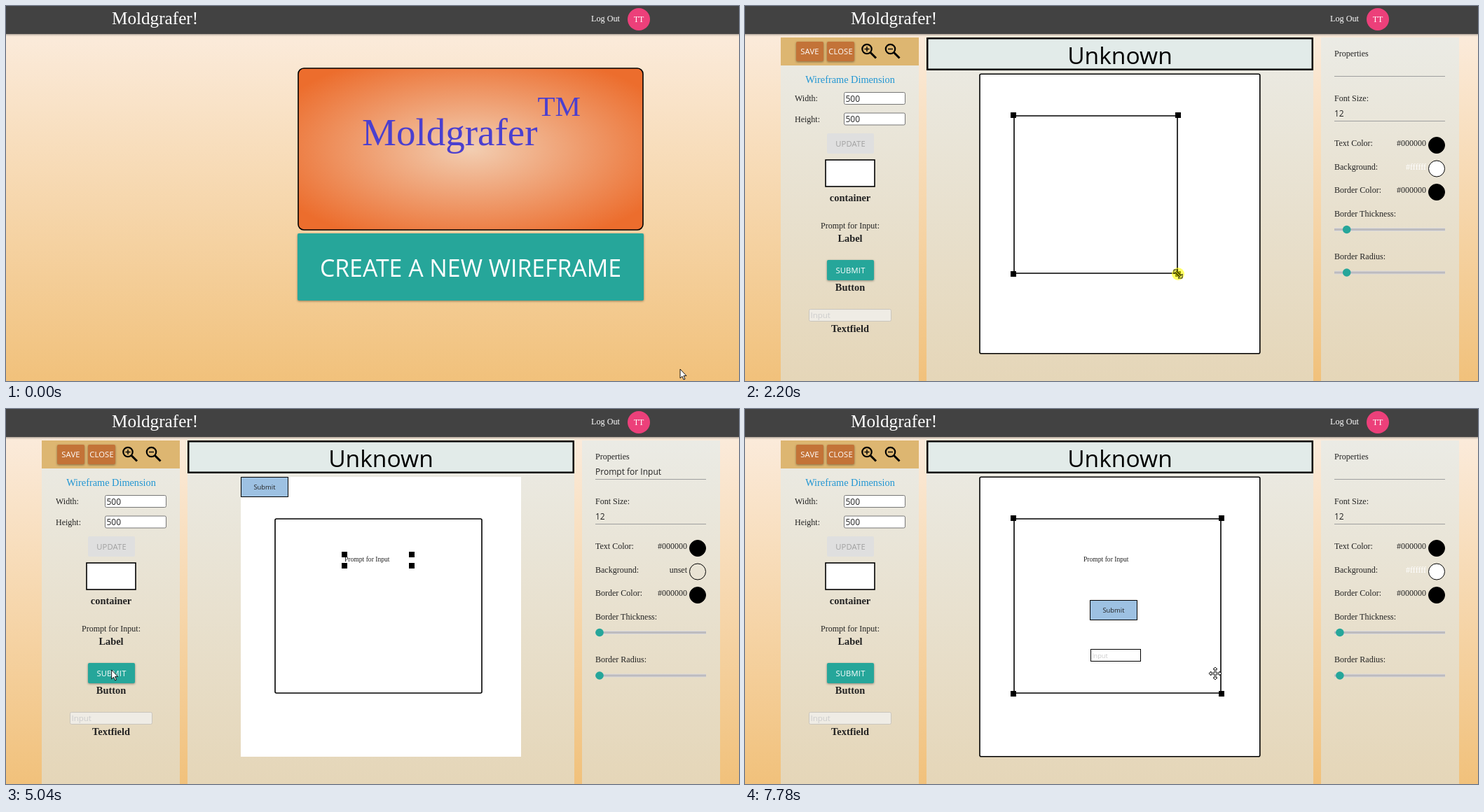
Recreate the animation shown at these times as an HTML page. Size 1046x536 px, loop 7860 ms.

```html
<!DOCTYPE html>
<html lang="en">
<head>
<meta charset="utf-8">
<title>Wireframe editor</title>
<style>
  html, body { margin: 0; width: 100%; height: 100%; overflow: hidden; }
  svg { display: block; width: 1046px; height: 536px; font-family: "Liberation Serif", serif; }
  .sans { font-family: "Open Sans", sans-serif; }
  .caps { font-family: "Open Sans", sans-serif; letter-spacing: .2px; }
  .mid { text-anchor: middle; }
  .end { text-anchor: end; }
  .bold { font-weight: bold; }
  .raised { filter: drop-shadow(0 1px 1.5px rgba(0, 0, 0, .4)); }
</style>
</head>
<body>
<svg viewBox="0 0 1046 536">
  <defs>
    <linearGradient id="page" gradientUnits="userSpaceOnUse" x1="0" y1="40" x2="0" y2="536">
      <stop stop-color="#fbebdb"/><stop offset="1" stop-color="#f1c17b"/>
    </linearGradient>
    <linearGradient id="panel" gradientUnits="userSpaceOnUse" x1="0" y1="45" x2="0" y2="536">
      <stop stop-color="#ebebe5"/><stop offset="1" stop-color="#e5d6b8"/>
    </linearGradient>
    <radialGradient id="glow" r=".707">
      <stop stop-color="#f2ceb2"/><stop offset=".88" stop-color="#ec6d2d"/>
    </radialGradient>
  </defs>
  <rect width="1046" height="536" fill="url(#page)"/>
  <g id="scene"></g>
  <g class="raised" id="bar"></g>
  <g id="pointer"></g>
</svg>
<script>
const LOOP = 7860, FRAMES = 100, STEP = LOOP / FRAMES;
const OPENED = 230, RESELECTED = 7530;
const TEAL = '#26a69a', BROWN = '#c37338', INK = '#222', BLACK = '#000000';
const $ = id => document.getElementById(id);
const clamp = (v, a, b) => Math.min(b, Math.max(a, v));

const rect = (x, y, w, h, fill, more = '') =>
  `<rect x="${x}" y="${y}" width="${w}" height="${h}" fill="${fill}" ${more}/>`;
const frame = (x, y, w, h, fill, line, color = '#000', r = 0) =>
  rect(x + line / 2, y + line / 2, w - line, h - line, fill, `stroke="${color}" stroke-width="${line}" rx="${r}"`);
const circle = (x, y, r, fill, more = '') => `<circle cx="${x}" cy="${y}" r="${r}" fill="${fill}" ${more}/>`;
const stroke = (d, width, color = '#000', more = '') =>
  `<path d="${d}" stroke="${color}" stroke-width="${width}" ${more}/>`;
const text = (x, y, str, size = 12, fill = INK, cls = '') =>
  `<text x="${x}" y="${y}" font-size="${size}" fill="${fill}" class="${cls}">${str}</text>`;
const button = (x, y, w, h, label, fill) =>
  rect(x, y, w, h, fill || '#dfdfdf', `rx="2" class="${fill ? 'raised' : ''}"`) +
  text(x + w / 2, y + h / 2 + 4, label, 11.2, fill ? '#fff' : '#a0a0a0', 'caps mid');

// Each part is clicked in the toolbox, appears at the canvas corner and is dragged to its place.
const corner = [335, 97];
const parts = [
  { tool: [150, 240], click: 880, from: 1330, to: 1580, leave: 1600, grab: [23, 16], at: [383, 156],
    size: [72, 40], line: 2, prop: '', back: '#ffffff', outlines: true,
    resize: [[1700, 455, 196], [2200, 618, 383], [2440, 680, 407]],
    draw: (x, y, w, h) => frame(x + .2, y + .2, w - .4, h - .4, '#fff', 1.6, '#000', 2) },
  { tool: [156, 314], click: 3060, from: 3620, to: 4010, leave: 4480, grab: [27, 8], at: [483, 208],
    size: [96, 16], line: 0, prop: 'Prompt for Input', back: 'unset', outlines: true,
    draw: (x, y) => text(x, y + 10.3, 'Prompt for Input', 9.6) },
  { tool: [148, 376], click: 4940, from: 5350, to: 5740, leave: 5900, grab: [38, 17], at: [492, 273],
    size: [68, 29], line: 1, prop: 'Submit', back: '#9dc1e2', via: [5580, 538, 278],
    draw: (x, y, w, h) => frame(x, y, w, h, '#9dc1e2', 1) + text(x + w / 2, y + 17.8, 'Submit', 9.4, INK, 'sans mid') },
  { tool: [146, 441], click: 6370, from: 6830, to: 7150, leave: 7220, grab: [27, 11], at: [493, 343],
    size: [72, 18], line: 1, prop: '', back: '#ffffff',
    draw: (x, y, w, h) => frame(x, y, w, h, '#fff', 1) + text(x + 2, y + 12.5, 'Input', 9.2, '#ccc', 'sans') }
];
const container = parts[0];
const [resizeFrom, resizeTo] = [container.resize[0][0], container.resize.at(-1)[0]];

// Pointer path as time, x, y, following from the parts.
const path = [[0, 962, 519], [320, 709, 382]];
for (const { tool, click, from, to, leave, grab, at, via, resize = [] } of parts) {
  const held = ([x, y]) => [x + grab[0], y + grab[1]];
  path.push([click - 70, ...tool], [click + 70, ...tool], [from - 20, ...held(corner)], [from, ...held(corner)]);
  if (via) path.push(via);
  path.push([to, ...held(at)], [leave, ...held(at)], ...resize);
}
path.push([7460, 671, 378], [LOOP, 671, 378]);

function pointerAt(t) {
  const i = Math.max(1, path.findIndex(k => k[0] >= t));
  const [t0, x0, y0] = path[i - 1], [t1, x1, y1] = path[i];
  const p = (t - t0) / (t1 - t0), e = p * p * (3 - 2 * p);
  return [x0 + (x1 - x0) * e, y0 + (y1 - y0) * e];
}

const selectedAt = t => t >= RESELECTED ? container : parts.findLast(p => t >= p.from);

function sizeOf(part, t) {
  if (!part.resize || t < resizeFrom) return part.size;
  return pointerAt(Math.min(t, resizeTo)).map((v, i) => v - part.at[i]);
}

function drawPart(part, t, selected) {
  if (t < part.click + 20) return '';
  const [x, y] = pointerAt(clamp(t, part.from, part.to)).map((v, i) => v - part.grab[i]);
  const [w, h] = sizeOf(part, t);
  let out = part.draw(x, y, w, h);
  if (part === selected)
    for (const hx of [x, x + w]) for (const hy of [y, y + h]) out += rect(hx - 4, hy - 4, 8, 8, '#000');
  return out;
}

function home() {
  return frame(416.2, 88.2, 493.6, 232.6, 'url(#glow)', 1.6, '#000', 8) +
    text(664, 199, 'Moldgrafer<tspan font-size="41" dy="-42">TM</tspan>', 55, '#4b3fcf', 'mid') +
    rect(416, 325, 494, 96, TEAL, 'rx="2" class="raised"') +
    text(663, 387, 'CREATE A NEW WIREFRAME', 33.8, '#fff', 'sans mid');
}

const magnifier = (x, sign) =>
  stroke(`M${x + 4.5} 66l8.5 8.5`, 3) + circle(x, 61.5, 6.7, 'none', 'stroke="#000" stroke-width="2.2"') +
  stroke(sign, 1.4, '#000', `transform="translate(${x} 61.5)"`);

const sizeField = (y, label) =>
  text(71, y + 13, label) + frame(141, y, 88, 18, '#fff', 1, '#767676', 2) +
  text(143.5, y + 13.5, '500', 12, INK, 'sans');

function tools(t) {
  const caption = (y, s) => text(150, y, s, 14.4, INK, 'mid bold');
  return rect(51, 45, 197, 491, 'url(#panel)') + rect(51, 45, 197, 40, '#ddb671') +
    button(73, 51, 39, 28, 'SAVE', t >= container.click + 20 && BROWN) + button(117, 51, 39, 28, 'CLOSE', BROWN) +
    magnifier(174, 'M-3.5 0H3.5M0-3.5V3.5') + magnifier(207.5, 'M-3.5 0H3.5') +
    text(150, 110, 'Wireframe Dimension', 14.3, '#2196d3', 'mid') +
    sizeField(123, 'Width:') + sizeField(152.5, 'Height:') + button(117, 182, 67, 29, 'UPDATE') +
    frame(114.2, 219.2, 71.6, 39.6, '#fff', 1.6) + caption(279, 'container') +
    text(150, 318, 'Prompt for Input:', 12, INK, 'mid') + caption(337, 'Label') +
    button(117, 363, 67, 29, 'SUBMIT', TEAL) + caption(407, 'Button') +
    frame(91, 433, 118, 18, '#efece5', 1, '#c9c5bd', 2) + text(93.5, 446, 'Input', 11.5, '#ccc', 'sans') +
    caption(466, 'Textfield');
}

function workspace(t, selected) {
  const busy = selected && selected.outlines &&
    (t >= RESELECTED || t < Math.max(selected.leave, selected.resize ? resizeTo + 80 : 0));
  return rect(259, 45, 552, 491, 'url(#panel)') + frame(259, 45, 552, 47, '#e2ebe9', 2.5) +
    text(535, 83, 'Unknown', 33.6, '#000', 'sans mid') +
    (busy ? frame(334.2, 96.4, 401.4, 401.2, '#fff', 1.6, '#000', 2) : rect(...corner, 400, 400, '#fff')) +
    parts.map(part => drawPart(part, t, selected)).join('');
}

function properties(t, part) {
  const field = (y, label, value) => text(841, y, label) +
    stroke(`M841 ${y + 28.5}h158`, 1, '#9e9e9e', part ? '' : 'stroke-dasharray="1 1"') +
    (part ? text(841, y + 21.5, value, 12, INK, 'sans') : '');
  const swatch = (y, label, value) => {
    const clear = value === 'unset', plain = clear || value === BLACK;
    return text(841, y, label) + text(972, y, value, 12, plain ? INK : value, 'end') +
      circle(987, y - 1, 11.5, clear ? 'none' : value, 'stroke="#000"');
  };
  // A slider runs to half the part's height, which shrinks by a fifth on screen.
  const height = part ? sizeOf(part, t < resizeTo + 30 ? Math.min(t, resizeFrom) : t)[1] : 1;
  const shift = part ? 146 * part.line * 1.6 / height : 0;
  const slider = (y, label) => text(841, y - 19, label) + rect(841, y - 2.5, 158, 5, '#dddbdc') +
    rect(841, y - 1.5, 158, 3, '#bdbbbf') + circle(847 + shift, y, 5.8, TEAL);
  return rect(822, 45, 197, 491, 'url(#panel)') +
    field(72, 'Properties', part && part.prop) + field(136, 'Font Size:', '12') +
    swatch(200, 'Text Color:', BLACK) + swatch(233.5, 'Background:', part ? part.back : BLACK) +
    swatch(267, 'Border Color:', BLACK) + slider(319.5, 'Border Thickness:') + slider(381, 'Border Radius:');
}

function cursor(t) {
  const [x, y] = pointerAt(t);
  const resizing = t >= resizeFrom && t < resizeTo + 20;
  const over = t >= 7440 || parts.some(p => t >= p.from - 20 && t < p.leave);
  const clicks = [OPENED - 25, RESELECTED + 50, ...parts.map(p => p.click)];
  const pressed = resizing || clicks.some(c => Math.abs(t - c) < 45) || parts.some(p => t >= p.from && t < p.to);
  const shape = resizing ? 'M-6-6H0L-2-4 4 2 6 0V6H0L2 4-4-2-6 0Z'
    : over ? 'M0-9L3-6H1V-1H6V-3L9 0 6 3V1H1V6H3L0 9-3 6H-1V1H-6V3L-9 0-6-3V-1H-1V-6H-3Z'
    : 'M0 0V13L3 10.3 5 15 7 14.2 5 9.6H9Z';
  return (pressed ? circle(x, y, 9, '#ff0', 'opacity=".6"') : '') +
    stroke(shape, .9, '#000', `transform="translate(${x} ${y})" fill="${resizing ? 'none' : '#fff'}"`);
}

$('bar').innerHTML = rect(-5, -5, 1056, 45, '#424242') + text(151, 26, 'Moldgrafer!', 25.2, '#fff') +
  text(835, 22, 'Log Out', 12.2, '#fff') + circle(903, 19, 16, '#ec407a') + text(903, 23, 'TT', 12, '#fff', 'mid');

let shown = -1;
function tick(now) {
  const step = Math.floor((now % LOOP) / STEP + .1) % FRAMES;
  if (step !== shown) {
    shown = step;
    const t = step * STEP, selected = selectedAt(t);
    $('scene').innerHTML = t < OPENED ? home() : tools(t) + workspace(t, selected) + properties(t, selected);
    $('pointer').innerHTML = cursor(t);
  }
  requestAnimationFrame(tick);
}
tick(performance.now());
</script>
</body>
</html>
```
